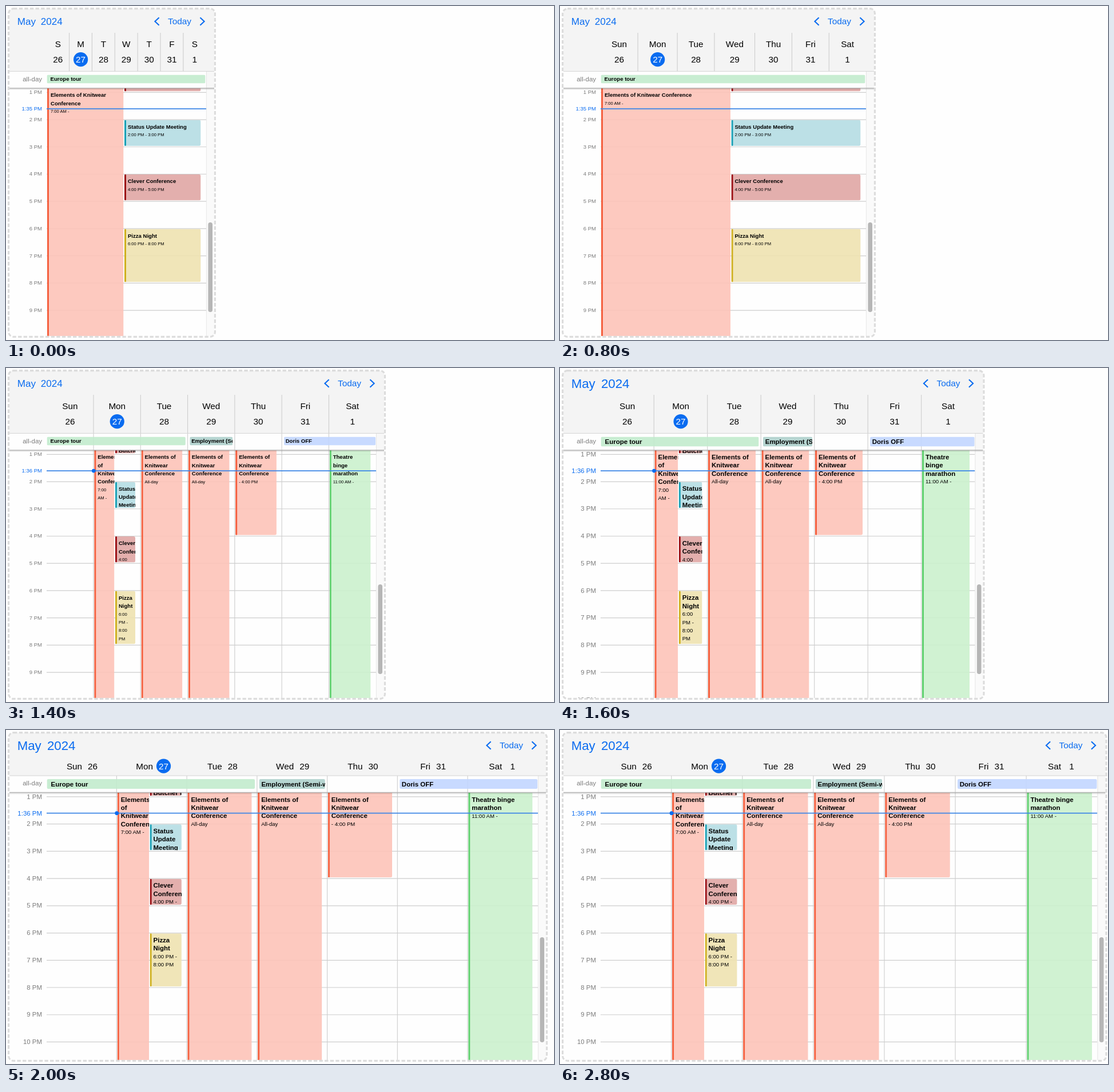
Animation of 958 by 585 pixels, one loop 3000 ms. Source, as an HTML page:

```html
<!DOCTYPE html>
<html lang="en">
<head>
<meta charset="utf-8">
<title>Responsive week calendar</title>
<style>
html, body { margin: 0; width: 100%; height: 100%; overflow: hidden; background: #fefefe; }
svg { display: block; font-family: "Liberation Sans", Arial, sans-serif; }
#stage { width: 958px; height: 585px; }
text { white-space: pre; }
</style>
</head>
<body>
<svg id="stage" viewBox="0 0 958 585"></svg>
<script>
const stage = document.getElementById('stage');
const pen = document.createElement('canvas').getContext('2d');
const LOOP = 3000, HOUR = 47.73, BLUE = '#0a6cf0', LINE = '#cdcdcd', BOTTOM = 578;
const DAYS = ['Sun', 'Mon', 'Tue', 'Wed', 'Thu', 'Fri', 'Sat'];
const DATES = [26, 27, 28, 29, 30, 31, 1];
const CONF = 'Elements of Knitwear Conference';

// Right edge of the panel from each moment on.
const RESIZES = [[0, 367], [800, 552], [1000, 559], [1400, 664], [1600, 742.5], [2000, 947], [2200, 956.5]];

const PINK = ['#fdc4b8', '#f4603f'], TEAL = ['#b5dde4', '#1aa0b5'], RED = ['#e0a7a5', '#9b0f14'],
      YELLOW = ['#efe3b1', '#cfb020'], GREEN = ['#cbf1ce', '#5fd06e'];

function textWidth(s, size, weight = 400) {
  pen.font = `${weight} ${size}px "Liberation Sans", Arial, sans-serif`;
  return pen.measureText(s).width;
}

function wrap(s, size, weight, room) {
  const lines = [];
  for (const word of s.split(' ')) {
    const last = lines.length - 1;
    const joined = last < 0 ? word : lines[last] + ' ' + word;
    if (last >= 0 && textWidth(joined, size, weight) <= room) lines[last] = joined;
    else lines.push(word);
  }
  return lines;
}

// y is the middle of the capitals.
function label(s, x, y, size, fill = '#000', anchor = 'start', weight = 400) {
  return `<text x="${x}" y="${y + size * 0.355}" font-size="${size}" fill="${fill}" text-anchor="${anchor}" font-weight="${weight}">${s}</text>`;
}

function rect(x, y, w, h, fill, more = '') {
  return `<rect x="${x}" y="${y}" width="${w}" height="${h}" fill="${fill}" ${more}/>`;
}

function line(x1, y1, x2, y2, color = LINE, w = 1.1) {
  return `<line x1="${x1}" y1="${y1}" x2="${x2}" y2="${y2}" stroke="${color}" stroke-width="${w}"/>`;
}

function crop(x, y, w, h, inner) {
  return `<svg x="${x}" y="${y}" width="${w}" height="${h}" viewBox="${x} ${y} ${w} ${h}" overflow="hidden">${inner}</svg>`;
}

function layout(right) {
  const week = right > 600, big = right > 700, wide = right > 850, tiny = right < 400;
  const end = right - 17, span = end - 71;
  const shares = week || tiny ? Array(7).fill(1) : [66.5, 70.2, 66, 71.8, 66, 66, 65.5];
  const total = shares.reduce((a, b) => a + b);
  const cols = [71];
  shares.forEach(s => cols.push(cols[cols.length - 1] + span * s / total));
  const head = wide ? 80 : 114.4;
  return {
    right, end, cols, head, week, big, wide, tiny,
    top: head + 29.4,
    size: big ? 11.46 : 9.55,
    small: big ? 9.55 : 7.64,
    hourY: h => head + 36.9 + (h - 1) * HOUR
  };
}

function eventBox(L, x, w, from, to, [fill, edge], title, time, firstY) {
  const y0 = L.hourY(from) + 0.6, y1 = L.hourY(to) - 1.8;
  const left = x + 1, width = w - 1.5, room = w - 11.5;
  let y = firstY || Math.max(y0 - 0.6, L.top) + 12.3;
  let out = rect(left, y0, width, y1 - y0, fill, 'rx="3" opacity=".9"') + rect(left, y0, 3, y1 - y0, edge, 'rx="1.3"');
  const put = (s, size, weight) => wrap(s, size, weight, room).forEach(row => {
    out += label(row, x + 7, y, size, '#000', 'start', weight);
    y += 14.32;
  });
  if (title) put(title, L.size, 700);
  if (time) put(time, L.small, 400);
  return crop(left, y0, width, y1 - y0, out);
}

function events(L) {
  const { cols, end } = L;
  const day = L.week ? 1 : 0;
  const x = cols[day];
  const half = ((L.week ? cols[2] : end) - 9 - x) / 2;
  const mid = x + half;
  let out = eventBox(L, x, half, 7 - 12, 14, PINK, CONF, '7:00 AM -');
  out += eventBox(L, mid, half, 0, 1, RED, L.week ? 'Butcher\u00a0l' : '', '', L.hourY(1) - 6.8);
  out += eventBox(L, mid, half, 2, 3, TEAL, 'Status Update Meeting', '2:00 PM - 3:00 PM');
  out += eventBox(L, mid, half, 4, 5, RED, 'Clever Conference', '4:00 PM - 5:00 PM');
  out += eventBox(L, mid, half, 6, 8, YELLOW, 'Pizza Night', '6:00 PM - 8:00 PM');
  if (L.week) {
    const full = (i, ...rest) => eventBox(L, cols[i], cols[i + 1] - cols[i] - 9, ...rest);
    out += full(2, -12, 14, PINK, CONF, 'All-day');
    out += full(3, -12, 14, PINK, CONF, 'All-day');
    out += full(4, -12, 4, PINK, CONF, '- 4:00 PM');
    out += full(6, -1, 14, GREEN, 'Theatre binge marathon', '11:00 AM -');
  }
  return out;
}

function separators(L, y1, y2) {
  return L.cols.slice(1, 7).map(x => line(x - 0.3, y1, x - 0.3, y2)).join('');
}

function body(L) {
  const { cols, end, top } = L;
  let out = '';
  for (let h = 1; h <= 10; h++) {
    const y = L.hourY(h);
    out += line(71, y, end, y, LINE, 1.2) + label(h + ' PM', 63, y - 0.4, L.size, '#7c7c7c', 'end');
  }
  if (L.week) out += separators(L, top, BOTTOM);
  out += events(L);

  const nowY = L.hourY(1) + 28.8;
  out += line(71, nowY, end, nowY, '#3c86e6', 1.7);
  if (L.week) out += `<circle cx="${cols[1]}" cy="${nowY}" r="3.4" fill="${BLUE}"/>`;
  out += label(L.week ? '1:36 PM' : '1:35 PM', 63, nowY, L.size, BLUE, 'end');

  out += rect(end, top, 14, BOTTOM - top, '#fafafa') + line(end + 0.4, top, end + 0.4, BOTTOM, '#e2e2e2', 0.8);
  const thumbY = L.wide ? 363 : 379;
  out += rect(end + 3.4, thumbY, 7.6, L.wide ? 184 : 157, '#b6b6b6', 'rx="3.8"');
  return crop(6, top, L.right - 9, BOTTOM - top, out);
}

function allDay(L) {
  const { cols, end, head, top } = L;
  const height = L.big ? 17 : 15;
  const midY = head + (L.big ? 14.6 : 13.6);
  const bar = (x1, x2, fill, s, textX) => crop(x1, midY - height / 2, x2 - x1, height,
    rect(x1, midY - height / 2, x2 - x1, height, fill, 'rx="2.5" opacity=".9"') +
    label(s, textX, midY, L.size, '#000', 'start', 700));
  const pad = L.big ? 7.3 : 6.3;
  let out = rect(6, head, L.right - 9, top - head, '#fefefe');
  out += rect(end, head, 14, top - head, '#f7f7f7') + line(end + 0.4, head, end + 0.4, top, '#dedede', 0.8);
  if (L.week) out += separators(L, head, top);
  out += label('all-day', 63, head + 13.2, 11.46, '#7c7c7c', 'end');
  out += bar(71.5, L.week ? cols[3] - 4 : end - 1.5, '#c3ebce', 'Europe tour', 71.3 + pad);
  if (L.week) {
    out += bar(cols[3] + 3.4, cols[4] - 4, '#aed1cd', 'Employment (Semi-weekly)', cols[3] + pad);
    out += bar(cols[5] + 3.6, end - 0.8, '#c3d6ff', 'Doris OFF', cols[5] + pad);
  }
  out += line(6, head, L.right - 3, head, '#d4d4d4', 1);
  out += line(6, top, L.right - 3, top, '#b4b4b4', 1.3);
  out += rect(6, top + 0.6, L.right - 9, 3, 'url(#shade)');
  return out;
}

function dayHeads(L) {
  const size = 15.28;
  let out = L.wide ? '' : separators(L, 47, L.head);
  DAYS.forEach((name, i) => {
    const mid = (L.cols[i] + L.cols[i + 1]) / 2;
    let x = mid - 0.2, y = 93.7;
    if (L.wide) {
      const w = textWidth(name, size), start = mid + 2.6 - (w + 31) / 2;
      x = start + w + 18.5;
      y = 63.2;
      out += label(name, start, y, size);
    } else {
      out += label(L.tiny ? name[0] : name, x, 67, size, '#000', 'middle');
    }
    if (i === 1) out += `<circle cx="${x}" cy="${y}" r="12.6" fill="${BLUE}"/>`;
    out += label(DATES[i], x, y, size, i === 1 ? '#fff' : '#000', 'middle');
  });
  return out;
}

function chevron(x, dir) {
  return `<path d="M${x - 3.6 * dir} 20.2L${x + 3.6 * dir} 27L${x - 3.6 * dir} 33.8" fill="none" stroke="${BLUE}" stroke-width="2.1"/>`;
}

function header(L) {
  const { right } = L, size = L.big ? 22.28 : 17.1;
  const yearX = 19.7 + textWidth('May ', size) + 4;
  return rect(6, 5, right - 9, L.head - 5, '#f4f4f4') +
    label('May', 19.7, 27, size, BLUE) + label('2024', yearX, 27, size, BLUE) +
    chevron(right - 103, -1) + label('Today', right - 84, 27, 15.4, BLUE) + chevron(right - 24, 1) +
    dayHeads(L);
}

function draw(right) {
  const L = layout(right);
  stage.innerHTML = `<defs>
    <linearGradient id="shade" x2="0" y2="1"><stop stop-color="#000" stop-opacity=".17"/><stop offset="1" stop-color="#000" stop-opacity="0"/></linearGradient>
    <clipPath id="panel"><rect x="4" y="4" width="${right - 5}" height="576" rx="9"/></clipPath></defs>
    <g clip-path="url(#panel)">${body(L)}${header(L)}${allDay(L)}</g>
    <rect x="4.6" y="4.6" width="${right - 6.2}" height="574.8" rx="8.5" fill="none" stroke="#dcdcdc" stroke-width="3.1" stroke-dasharray="6.4 3.2"/>`;
}

let shown = 0;
function tick(now) {
  const t = now % LOOP;
  const right = RESIZES.filter(([at]) => at <= t).pop()[1];
  if (right !== shown) draw(shown = right);
  requestAnimationFrame(tick);
}
tick(0);
</script>
</body>
</html>
```
